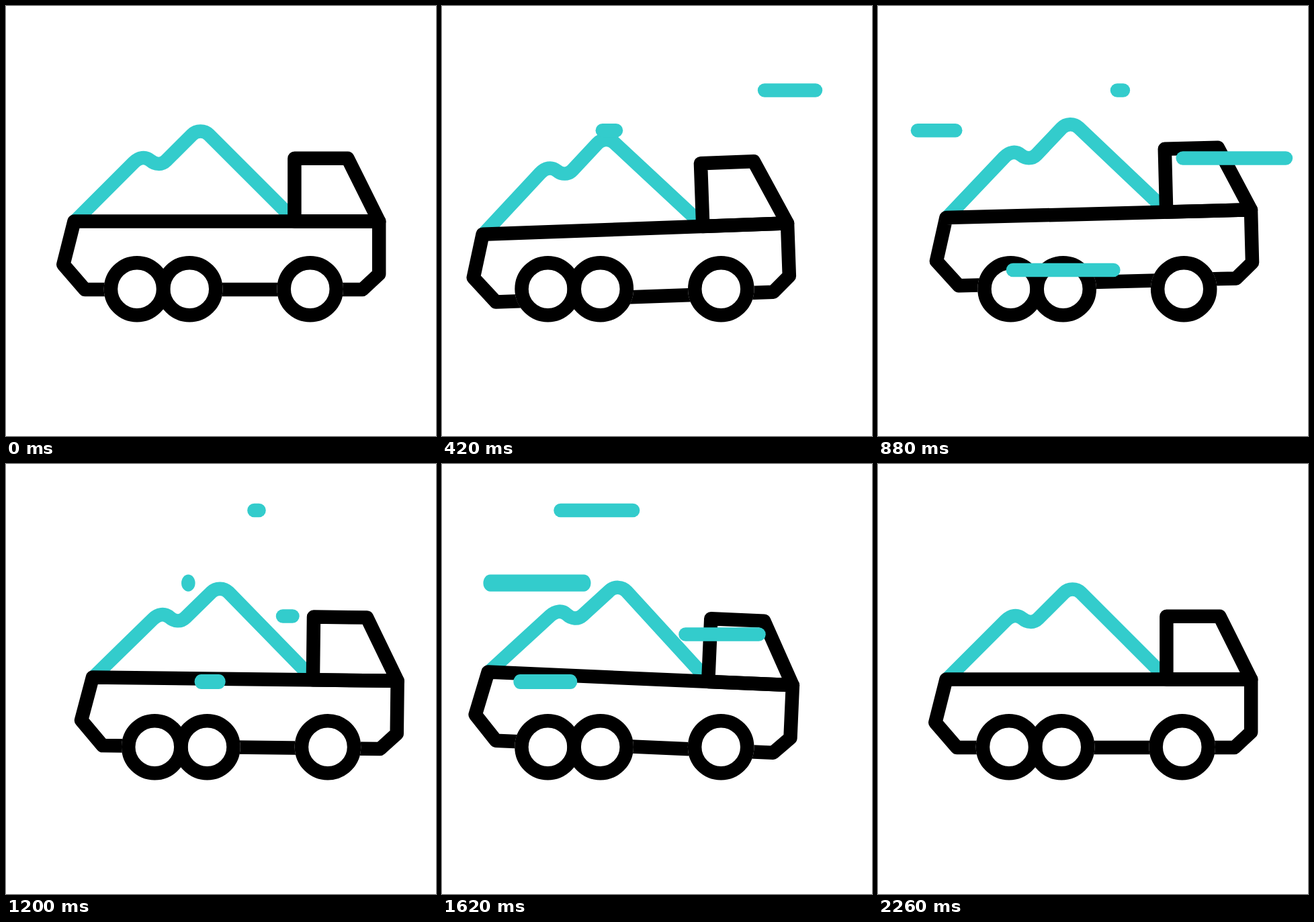
Animation of 640x640 px, one loop 2400 ms. Source, as an HTML page:

```html
<!DOCTYPE html>
<html lang="en">
<head>
<meta charset="utf-8">
<title>Dump truck</title>
<style>
  @property --tip { syntax: '<length>'; inherits: false; initial-value: 0px; }
  @property --tail { syntax: '<length>'; inherits: false; initial-value: 0px; }

  html, body { margin: 0; width: 100%; height: 100%; overflow: hidden; background: #fff; }
  svg { display: block; width: 100vw; height: 100vh; }

  path, .ring { fill: none; stroke: #000; stroke-width: 20.5; stroke-linejoin: round; stroke-linecap: round; }
  circle { cy: 421.2px; }
  .ring { r: 39.05px; }
  .hub { r: 49.3px; fill: #fff; }
  .pile { stroke: #33cccc; stroke-linecap: butt; }

  .truck, .body, .streaks path {
    animation: drive 2400ms cubic-bezier(.333, 0, .667, 1) infinite;
  }
  .body { animation-name: bounce, tilt; transform-origin: 324px 422px; }

  /* One beat is 48 ms, 2% of the loop */
  .streaks path {
    stroke: #33cccc;
    visibility: hidden;
    stroke-dasharray: calc(var(--tip) - var(--tail)) 999px;
    stroke-dashoffset: calc(-1 * var(--tail));
    animation-name: streak;
    animation-delay: calc(var(--beat) * 48ms);
  }

  @keyframes drive {
    0%, 90%, 100% { translate: 0; }
    24% { translate: -45.5px; }
    46% { translate: 32.5px; }
    68% { translate: -37.6px; }
  }
  @keyframes tilt {
    0%, 90%, 100% { rotate: 0deg; }
    24% { rotate: -2.5deg; }
    68% { rotate: 2.5deg; }
  }
  @keyframes bounce {
    0%, 94%, 100% { translate: 0 0; }
    19% { translate: 0 11.3px; }
    38% { translate: 0 -11.5px; }
    58% { translate: 0 5.5px; }
    77% { translate: 0 -8px; }
  }
  /* The tip runs ahead, the tail catches up */
  @keyframes streak {
    0% { --tip: 0px; visibility: hidden; }
    .01% { visibility: visible; }
    11% { --tail: 0px; }
    18% { --tip: 200px; }
    29% { --tail: 200px; visibility: visible; }
    29.01%, 100% { --tip: 200px; --tail: 200px; visibility: hidden; }
  }
</style>
</head>
<body>
<svg viewBox="0 0 640 640">
  <g class="truck">
    <g class="body">
      <path class="pile" d="M104 319L190 233C198 225 207.5 223.5 215 230C222 236 231.5 237 238.5 230L276.8 191.7A18 18 0 0 1 302.2 191.7L427 316.5"/>
      <path d="M101.5 320.5H555.2V399L530.5 422H117.5L85.3 384.7Z"/>
      <path d="M429.4 320.5V226.7H508.5L555.2 320.5Z"/>
    </g>
    <circle class="hub" cx="195"/>
    <circle class="hub" cx="273.2"/>
    <circle class="hub" cx="452.7"/>
    <circle class="ring" cx="195"/>
    <circle class="ring" cx="273.2"/>
    <circle class="ring" cx="452.7"/>
  </g>
  <g class="streaks">
    <path style="--beat: 5" d="M556 125.4h-200"/>
    <path style="--beat: 7" d="M259 185.3h-200"/>
    <path style="--beat: 10" d="M398 393h-200"/>
    <path style="--beat: 12" d="M612 226.4h-200"/>
    <path style="--beat: 23" d="M316.5 0h-200" transform="translate(0 324) scale(1 1.07)"/>
    <path style="--beat: 24" d="M376.5 69h-200"/>
    <path style="--beat: 25" d="M271.3 0h-200" transform="translate(0 177.2) scale(1 1.23)"/>
    <path style="--beat: 29" d="M471.5 253.5h-200"/>
  </g>
</svg>
</body>
</html>
```
